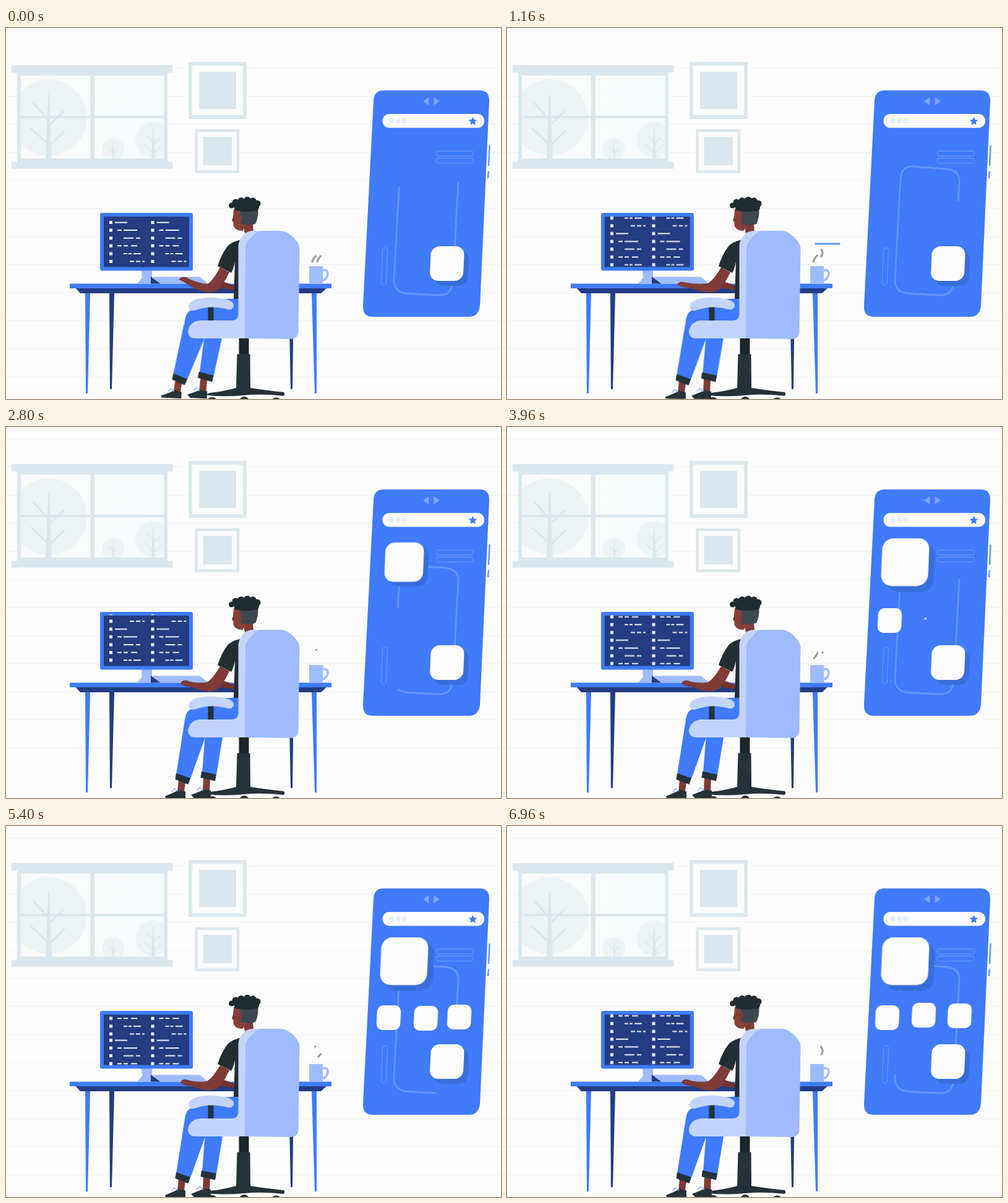
Animation of 800 by 600 pixels, one loop 7 s. Source, as an HTML page:

```html
<!DOCTYPE html>
<html lang="en">
<head>
<meta charset="utf-8">
<title>Developer at a desk</title>
<style>
  html, body { margin: 0; width: 100%; height: 100%; overflow: hidden; background: #fcfcfc; }
  svg { display: block; width: 100vw; height: 100vh; }
  .pale { fill: #dbe7ec; }
  .leaf { fill: #edf3f4; }
  .twig { stroke: #dbe7ec; fill: none; }
  .blue { fill: #3f7bfa; }
  .navy { fill: #233c82; }
  .soft { fill: #a0bbfc; }
  .mist { fill: #c3d4fc; }
  .dark { fill: #253238; }
  .skin { fill: #7e3b37; }
  .white { fill: #fcfcfc; }
  .shade { fill: #386ddc; }
  .trace { fill: none; stroke: #6595fb; }

  .anim { animation: 7s linear infinite; }
  #code { animation-name: scroll; }
  #ring { animation-name: circle; stroke-dasharray: 432 133; }
  #link { animation-name: link; }
  #steamA { animation-name: steamA; }
  #steamB { animation-name: steamB; }
  #arm { animation-name: arm; animation-timing-function: ease-in-out; }
  .leg { animation-name: leg; }
  #legL { transform-origin: 300px 470px; }
  #legR { transform-origin: 338px 478px; }
  #tile1 { animation-name: tile1; }
  #tile2 { animation-name: tile2; }
  #tile3 { animation-name: tile3; }
  #tile4 { animation-name: tile4; }

  @keyframes scroll { to { transform: translateY(-347.2px); } }
  @keyframes circle { from { stroke-dashoffset: 0; } to { stroke-dashoffset: -992; } }
  @keyframes link {
    0%, 14.29% { stroke-dasharray: 0 0 0 300; }
    16.57% { stroke-dasharray: 0 0 41 300; }
    24.57% { stroke-dasharray: 0 96 97 300; }
    31.7%, 100% { stroke-dasharray: 0 193 0 300; }
  }
  @keyframes steamA {
    0% { stroke-dasharray: 0 0 50 200; }
    16.57% { stroke-dasharray: 0 0 56 200; }
    24.57% { stroke-dasharray: 0 4 62 200; }
    40% { stroke-dasharray: 0 74 10 200; }
    43% { stroke-dasharray: 0 100 0 200; }
    43.01% { stroke-dasharray: 0 0 0 200; }
    56.57% { stroke-dasharray: 0 14 52 200; }
    77.14% { stroke-dasharray: 0 90 10 200; }
    79%, 100% { stroke-dasharray: 0 100 0 200; }
  }
  @keyframes steamB {
    0% { stroke-dasharray: 0 0 50 200; }
    16.57% { stroke-dasharray: 0 36 58 200; }
    24.57% { stroke-dasharray: 0 76 24 200; }
    30%, 46% { stroke-dasharray: 0 100 0 200; }
    46.01% { stroke-dasharray: 0 0 0 200; }
    56.57% { stroke-dasharray: 0 56 12 200; }
    61% { stroke-dasharray: 0 100 0 200; }
    61.01% { stroke-dasharray: 0 0 0 200; }
    77.14% { stroke-dasharray: 0 20 32 200; }
    99.43%, 100% { stroke-dasharray: 0 40 60 200; }
  }
  @keyframes leg {
    0% { transform: rotate(3deg); }
    16.57% { transform: rotate(.5deg); }
    24.57% { transform: rotate(.1deg); }
    30%, 100% { transform: rotate(0deg); }
  }
  @keyframes arm {
    0% { d: path("M346 387L361 395Q352 414 344 422Q336 429 322 427Q308 424 296 416Q286 410 280 407Q281 402 291 403Q306 412 326 414Q334 409 346 387Z"); }
    16.57% { d: path("M346 387L361 395Q352 414 344 422Q336 429 322 427Q308 424 292 420Q280 419 275 415Q278 409 286 411Q304 415 324 413Q333 409 346 387Z"); }
    24.57% { d: path("M346 387L361 395Q352 414 344 422Q336 429 322 427Q308 424 296 420Q286 419 280 414Q283 408 291 410Q304 415 324 413Q333 409 346 387Z"); }
    30%, 100% { d: path("M346 387L361 395Q352 414 344 422Q336 429 322 427Q308 424 297 420Q287 420 282 415Q284 409 292 410Q304 415 324 413Q333 409 346 387Z"); }
  }
  @keyframes tile1 {
    0%, 30.5% { transform: scale(0); }
    42.1%, 100% { transform: scale(1); }
  }
  @keyframes tile2 {
    0%, 46.3% { transform: translate(618.5px, 313px) scale(0); }
    55.4%, 56.57% { transform: translate(618.5px, 313px) scale(1); }
    77.14% { transform: translate(618.5px, 310px) scale(1); }
    99.43%, 100% { transform: translate(614.5px, 310px) scale(1); }
  }
  @keyframes tile3 {
    0%, 56% { transform: translate(676px, 310px) scale(0); }
    64% { transform: translate(677px, 310.5px) scale(1); }
    77.14% { transform: translate(678.5px, 311px) scale(1); }
    99.43%, 100% { transform: translate(673.5px, 306px) scale(1); }
  }
  @keyframes tile4 {
    0%, 63.1% { transform: translate(732.5px, 309px) scale(0); }
    71.4%, 77.14% { transform: translate(732.5px, 309px) scale(1); }
    99.43%, 100% { transform: translate(731.5px, 307px) scale(1); }
  }
</style>
</head>
<body>
<svg viewBox="0 0 800 600" preserveAspectRatio="none">
  <defs>
    <clipPath id="screen"><rect x="158" y="303.5" width="138" height="83"/></clipPath>
    <clipPath id="glass"><rect x="24" y="77" width="232" height="135"/></clipPath>
    <linearGradient id="sky"><stop stop-color="#fbfafa"/><stop offset="1" stop-color="#f5fafb"/></linearGradient>
    <rect id="tile" x="-19.2" y="-20" width="38.4" height="40" rx="10" transform="skewX(-2.5)"/>
    <rect id="mid" x="-27" y="-28" width="54" height="56" rx="14" transform="skewX(-2.5)"/>
    <rect id="big" x="-38" y="-38.7" width="76" height="77.4" rx="18" transform="skewX(-2.5)"/>
  </defs>

  <rect class="white" width="800" height="600"/>
  <path id="rules" stroke="#edf2f5" fill="none"/>

  <!-- window -->
  <rect x="24" y="77" width="232" height="135" fill="url(#sky)"/>
  <g clip-path="url(#glass)">
    <circle class="leaf" cx="69" cy="145" r="62"/>
    <circle class="leaf" cx="173" cy="197" r="18"/>
    <circle class="leaf" cx="238" cy="181" r="29"/>
    <path class="pale" d="M64 212L68 107H70L74 212ZM172 212L172.500 184H173.500L175 212ZM235 212L237.500 163H238.500L241 212Z"/>
    <path class="twig" stroke-width="3" d="M68 148L44 121M70 157L94 134M67 187L40 162M70 191L95 166"/>
    <path class="twig" stroke-width="1.500" d="M173 201L166 193M173 204L180 196M238 184L227 173M238 188L249 177M238 202L223 187M238 203L252 190"/>
  </g>
  <path class="pale" d="M9 60H269.500V72H9ZM9 216.500H269.500V227.500H9ZM18 72H24V217H18ZM255.500 72H261V217H255.500ZM24 72H256V77H24ZM24 211H256V217H24ZM136 77H143V212H136ZM24 142H256V146H24Z"/>

  <!-- pictures -->
  <g fill="#fcfcfc" stroke="#dbe7ec">
    <rect x="298" y="58" width="88" height="86" stroke-width="6"/>
    <rect x="307.500" y="166" width="67.500" height="66.500" stroke-width="4.500"/>
  </g>
  <path class="pale" d="M312 71H372V131H312ZM318.500 176H365V222H318.500Z"/>

  <!-- desk -->
  <path class="navy" d="M167 429H175L171 584H168ZM457 429H465L463 584H460ZM112 420H519L509 429H120Z"/>
  <path class="blue" d="M128 429H136L132 591H129ZM494 429H502L502 591H499ZM103 413.500H526V421H103Z"/>

  <!-- monitor and keyboard -->
  <path class="soft" d="M219 392H236V404L249 413.500H212L220 404ZM236 402.500H313L327 413.500H249Z"/>
  <path class="navy" d="M234 402L249.500 413.500H234Z"/>
  <rect class="blue" x="152" y="299" width="150" height="93.500" rx="3"/>
  <rect class="navy" x="158" y="305" width="138" height="81.500"/>
  <g clip-path="url(#screen)">
    <g id="code" class="anim" fill="none" stroke="#eef2f8">
      <path id="marks" stroke-width="5"/>
      <path id="words" stroke-width="2"/>
    </g>
  </g>

  <!-- cup -->
  <path class="soft" d="M490 385H512V413.500H490Z"/>
  <path d="M512 392Q520 390 520 398Q518 407 512 408" fill="none" stroke="#a0bbfc" stroke-width="3.500"/>
  <g fill="none" stroke="#999" stroke-width="3">
    <path id="steamA" class="anim" pathLength="100" d="M495 379C496 370 502 371 502 364C502 360 500 359 499 355.500"/>
    <path id="steamB" class="anim" pathLength="100" d="M503 379C504 370 510 371 510 364C510 360 508 359 507 355.500"/>
  </g>

  <!-- legs -->
  <g id="legR" class="leg anim">
    <path class="skin" d="M319 566L330 568L329 589H318Z"/>
    <path class="dark" d="M299 595Q312 590 321 586L331 588V600H304Z"/>
    <path d="M308 588L313 583L319 588" fill="none" stroke="#8fb0ff" stroke-width="1.500"/>
    <path class="blue" d="M323 485H351L350 502L340 563L317 558Z"/>
    <path class="dark" d="M316 557L340 562L338 572.500L314.500 567Z"/>
  </g>
  <g id="legL" class="leg anim">
    <path class="skin" d="M279 570L290 573L288 590H277Z"/>
    <path class="dark" d="M257 597Q270 592 279 587L290 589.500V600H258Z"/>
    <path d="M268 590L272 585L278 589" fill="none" stroke="#8fb0ff" stroke-width="1.500"/>
    <path class="blue" d="M288 480H324L322 502L298 569L275 562Z"/>
    <path class="dark" d="M275 560L298 568L294.500 578L273.500 570Z"/>
  </g>
  <path class="blue" d="M288 488Q288 465 295 459Q315 444 348 439L376 437V488Z"/>

  <!-- chair base -->
  <path fill="#1c2529" d="M376.500 500H392.500V530H376.500Z"/>
  <path class="dark" d="M373.500 527.500H394.500L395 582Q420 586 449 589Q452 593 448 595Q412 591 385 594Q352 597 326 594Q322 592 330 590Q355 587 372 582Z"/>
  <path class="dark" d="M326 600Q333 594 340 600ZM378 600Q385 592 392 600ZM430 600Q437 595 443 600Z"/>
  <path class="dark" d="M326.500 448H335.500V476H326.500Z"/>

  <!-- head -->
  <path class="skin" d="M385 314L399 316L400 331L388 338L385 328Z"/>
  <path fill="#873f3a" d="M368 293L367 305L365 312L367.500 314V320Q371 328 382 328L388 321V293Z"/>
  <path fill="#3c494f" d="M379 294H407.500Q408 307 403 317Q393 320 378 317Q384 306 378 299Z"/>
  <path class="skin" d="M376 301Q382 302 380 309Q379 314 376 313Z"/>
  <path d="M366 309.500H369" stroke="#222c30" stroke-width="1.500"/>
  <g fill="#212c30">
    <ellipse cx="388" cy="288" rx="20" ry="9.500"/>
    <circle cx="364.500" cy="287" r="4.500"/>
    <circle cx="371" cy="282" r="5.500"/>
    <circle cx="380" cy="279.500" r="5.500"/>
    <circle cx="390" cy="278.500" r="5.800"/>
    <circle cx="399" cy="280" r="5.800"/>
    <circle cx="406" cy="284" r="5.500"/>
    <circle cx="374" cy="291" r="5"/>
    <circle cx="403" cy="290" r="6"/>
  </g>

  <!-- torso and arms -->
  <path fill="#713430" d="M347 409L371 417V424L341 420Z"/>
  <path id="arm" class="skin anim" d="M346 387L361 395Q352 414 344 422Q336 429 322 427Q308 424 297 420Q287 420 282 415Q284 409 292 410Q304 415 324 413Q333 409 346 387Z"/>
  <path fill="#242e32" d="M388 341Q366 344 358 353Q348 366 342 385L364 396Q368 389 370 378L368 438H380V352Z"/>

  <!-- chair -->
  <path class="mist" d="M375.500 462V352Q376 342 385 333Q391 328 400 328H418L388 360V502H306Q294 502 294 490Q297 475 313 473H365Q375 473 375.500 462Z"/>
  <path class="soft" d="M386 502L387 354Q388 346 399 336Q405 328 414 328H445Q454 328 466 340Q475 350 474.500 358L472.500 492Q471 503 460 503Z"/>
  <path class="mist" d="M295 452Q295 441 312 437.500Q336 433 361 440.500Q369 444 368 450Q366 457 358 455Q330 447 304 457Q296 458 295 452Z"/>

  <!-- phone -->
  <path id="link" class="trace anim" stroke-width="3" d="M497 349H542V236H577"/>
  <path class="blue" d="M610 101H766Q781 101 781 118L766 449Q764 467 748 467H593Q576 467 577 449L594 117Q595 101 610 101Z"/>
  <path class="trace" stroke-width="2.500" d="M781.500 190L780 223M779.800 231.500L779 243"/>
  <path fill="#7ea5fc" d="M674 118.500L683 112V125ZM700.500 118.500L691.500 112V125Z"/>
  <rect x="608.500" y="139" width="164.500" height="22.500" rx="11" fill="#faf9fb"/>
  <g fill="#e6eefb"><circle cx="623.500" cy="150.300" r="4"/><circle cx="634" cy="150.300" r="4"/><circle cx="644" cy="150.300" r="4"/></g>
  <path id="star" class="blue"/>
  <g class="trace" stroke-width="1.300">
    <rect x="695.500" y="199" width="60" height="8" rx="4"/>
    <rect x="695" y="210.500" width="60" height="8" rx="4"/>
    <rect x="-4" y="-30" width="8" height="60" rx="4" transform="translate(611.500 385.500) skewX(-2.500)"/>
  </g>
  <path id="ring" class="trace anim" stroke-width="2.800" pathLength="565" d="M731 249L722 410Q720 434 697 432L650 429.500Q626 428 627 406L636 243Q638 222 658 224L710 228Q732 230 731 249Z"/>

  <!-- tiles -->
  <use href="#mid" class="shade" x="720" y="389"/>
  <use href="#mid" class="white" x="712.800" y="381"/>
  <g transform="translate(643.500 218.500)">
    <g id="tile1" class="anim">
      <use href="#big" class="shade" x="9" y="9"/>
      <use href="#big" class="white"/>
    </g>
  </g>
  <g class="white">
    <use id="tile2" class="anim" href="#tile"/>
    <use id="tile3" class="anim" href="#tile"/>
    <use id="tile4" class="anim" href="#tile"/>
  </g>
</svg>
<script>
  const setPath = (id, d) => document.getElementById(id).setAttribute('d', d);
  const range = n => [...Array(n).keys()];

  setPath('rules', range(13).map(i => `M0 ${Math.round(20 + 45.4 * i) - .5}H800`).join(''));

  setPath('star', 'M' + range(10).map(i => {
    const r = i % 2 ? 3.4 : 7.2, a = (i / 5 - .5) * Math.PI;
    return `${754.5 + r * Math.cos(a)} ${151 + r * Math.sin(a)}`;
  }).join('L') + 'Z');

  // Each line of code is a list of [x, width] words.
  const lines = [
    [[176, 20]],
    [[180, 7], [190, 22]],
    [[190, 16], [210, 7]],
    [[180, 7], [190, 7], [202, 10]],
    [[190, 6], [198, 5], [206, 12]],
    [[200, 7], [210, 7], [220, 4]]
  ];
  let marks = '', words = '';
  for (const n of range(36)) {
    const y = 314.5 + 12.6 * n - (n > 23 ? 2.5 : 0);
    for (const dx of [0, 67.5]) {
      marks += `M${167 + dx} ${y}h5`;
      for (const [x, w] of lines[n % 6]) words += `M${x + dx} ${y}h${w}`;
    }
  }
  setPath('marks', marks);
  setPath('words', words);
</script>
</body>
</html>
```
